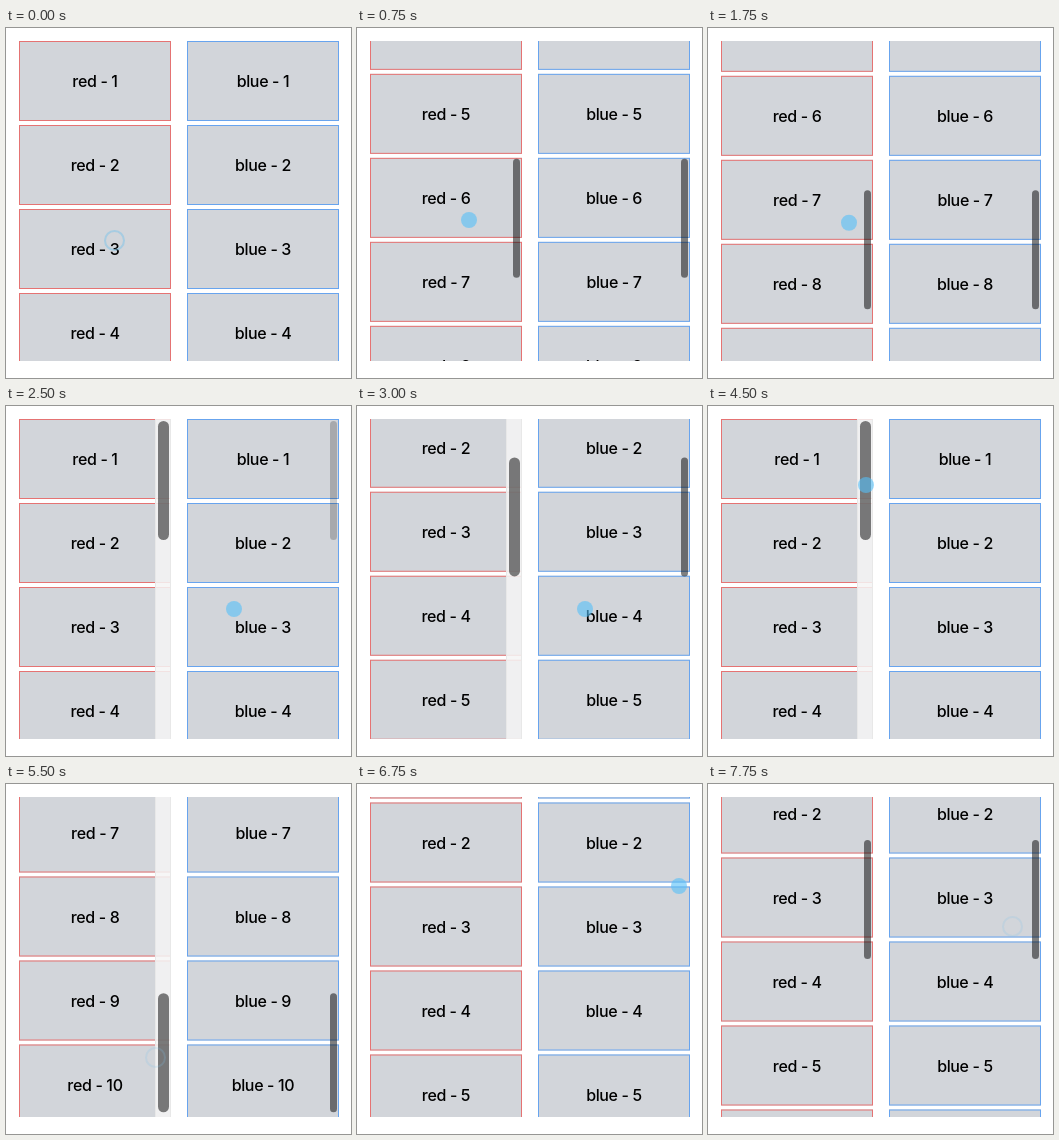
Animation of 345x350 px, one loop 8000 ms. Source, as an HTML page:

```html
<!DOCTYPE html>
<html lang="en">
<head>
<meta charset="utf-8">
<title>Synced scroll panes</title>
<style>
  html, body { margin: 0; width: 100%; height: 100%; overflow: hidden; background: #fff; }
  .pane { position: absolute; top: 13px; width: 152px; height: 320px; overflow: hidden; }
  .red { left: 13px; --line: #e57373; }
  .blue { left: 181px; --line: #68a4ee; }
  .item {
    box-sizing: border-box; height: 80px; margin-bottom: 4px;
    border: 1px solid var(--line); background: #d2d5da; color: #000;
    font: 500 16px/78px Inter, Roboto, sans-serif; letter-spacing: -.35px; text-align: center;
  }
  .track {
    position: absolute; top: 0; right: 0; width: 16px; height: 100%; box-sizing: border-box;
    background: rgba(245, 245, 245, .86); border: solid #e8e8e8; border-width: 0 1px; display: none;
  }
  .thumb {
    position: absolute; top: 2px; right: 2px; width: 7.5px; height: 118.5px;
    border-radius: 6px; background: #000;
  }
  .wide .track { display: block; }
  .wide .thumb { width: 11px; }
  #pointer { position: absolute; left: 0; top: 0; box-sizing: border-box; border-radius: 50%; }
  #pointer.disc { width: 16px; height: 16px; margin: -8px; background: rgba(85, 192, 248, .6); }
  #pointer.ring { width: 21px; height: 21px; margin: -10.5px; border: 2px solid #7cc4ea; }
</style>
</head>
<body>
<script>
const LOOP = 8000, STEP = 250, ROWS = 10;
const BOTTOM = 520, THUMB_RATIO = 0.382;
const BAR_OPACITY = 0.5, BAR_FADE = 420;

const linear = u => u;
const smooth = u => u * u * (3 - 2 * u);

// Moves: start, end, then the values reached
const scrollMoves = [
  [125, 1250, BOTTOM], [1250, 1500, BOTTOM], [1500, 2250, 0],
  [2750, 3665, BOTTOM], [3665, 4000, 0],
  [4750, 5500, 508.5], [5500, 6000, 78.5], [7250, 7750, 107.5]
];
const pointerMoves = [
  [250, 750, 112, 192], [1500, 2500, 228, 203], [3500, 3750, 185, 19], [3750, 4250, 158, 79],
  [4750, 5500, 149, 273], [5500, 6000, 158, 109], [6000, 6750, 322, 102], [7250, 7750, 304, 142]
];
const restingRing = { 0: .5, 5500: .2, 7750: .2 };

function follow(values, moves, ease, t) {
  for (const [start, end, ...goal] of moves) {
    if (t <= start) break;
    const u = ease(Math.min(1, (t - start) / (end - start)));
    values = values.map((v, i) => v + (goal[i] - v) * u);
  }
  return values;
}

// Bars show during a scroll and fade out after it
function barOpacity(t) {
  const last = scrollMoves.filter(([start]) => start < t).pop();
  if (!last) return 0;
  const idle = Math.max(0, t - last[1]);
  return BAR_OPACITY * Math.max(0, 1 - idle / BAR_FADE);
}

function add(parent, className, text = "") {
  const node = document.createElement("div");
  node.className = className;
  node.textContent = text;
  parent.append(node);
  return node;
}

function makePane(name) {
  const root = add(document.body, "pane " + name);
  const list = add(root, "list");
  for (let i = 1; i <= ROWS; i++) add(list, "item", `${name} - ${i}`);
  add(root, "track");
  return { root, list, thumb: add(root, "thumb") };
}

const red = makePane("red"), blue = makePane("blue");
const pointer = add(document.body, "disc");
pointer.id = "pointer";

function render(t) {
  const [scroll] = follow([0], scrollMoves, smooth, t);
  const [x, y] = follow([108, 212], pointerMoves, linear, t);
  const redHeld = t >= 2500 && t < 6250;

  for (const { list, thumb } of [red, blue]) {
    list.style.transform = `translateY(${-scroll}px)`;
    thumb.style.transform = `translateY(${scroll * THUMB_RATIO}px)`;
    thumb.style.opacity = barOpacity(t);
  }
  red.root.classList.toggle("wide", redHeld);
  if (redHeld) red.thumb.style.opacity = BAR_OPACITY;

  const ring = restingRing[t];
  pointer.className = ring ? "ring" : "disc";
  pointer.style.opacity = ring || 1;
  pointer.style.transform = `translate(${x}px, ${y}px)`;
}

const begin = performance.now();
function tick() {
  const t = (performance.now() - begin) % LOOP;
  render(Math.floor(t / STEP) * STEP);
  requestAnimationFrame(tick);
}
tick();
</script>
</body>
</html>
```
